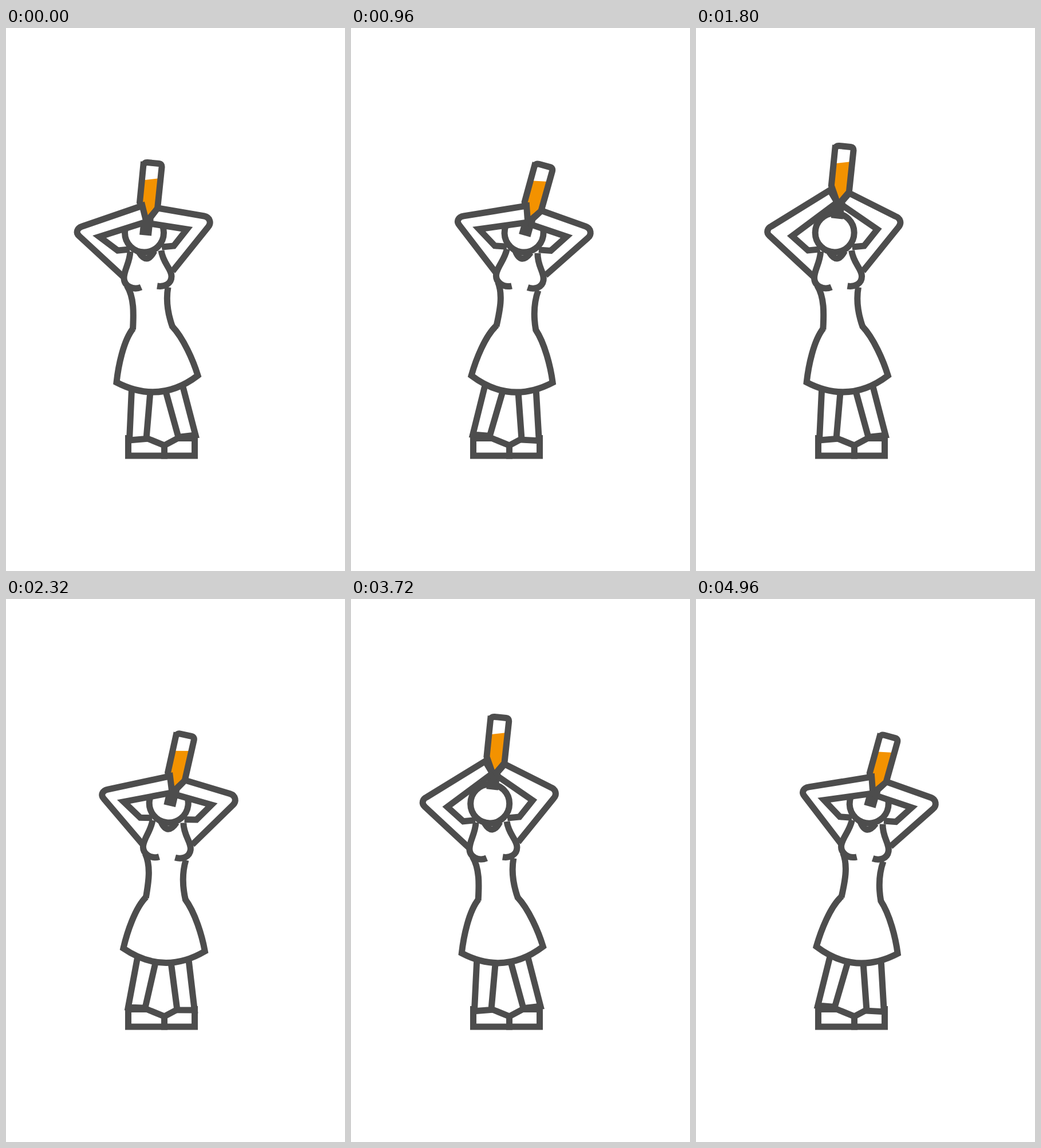
An HTML page for the animation above (5 s loop, 592 by 947 pixels).

```html
<!DOCTYPE html>
<html>
<head>
<meta charset="utf-8">
<style>
  html, body { margin: 0; width: 100%; height: 100%; overflow: hidden; background: #fff; }
  svg { display: block; width: 592px; height: 947px; }
</style>
</head>
<body>
<svg viewBox="0 0 592 947" fill="#fff" stroke="#4d4d4d" stroke-width="11" stroke-miterlimit="10">
  <g id="shoes">
    <path d="M213.5 746V715.5H246L276.5 728V746Z"/>
    <path d="M276.5 746V728L300 715.5H329.5V746Z"/>
  </g>
  <g id="body">
    <g id="legs">
      <path d="M219.5 630L215.5 719L245 716.5L252 634"/>
      <path d="M279 634L301 713.5L331 710L309 626"/>
    </g>
    <path d="M232 391Q246 414 259 389"/>
    <circle cx="241.5" cy="357" r="34"/>
    <g id="bottle" fill="none">
      <path d="M238 265.5L269 262L264 315L248 333L234 303Z" fill="#f39200" stroke="none"/>
      <path d="M240.5 233L233.5 304L243 331M240.5 240Q241 234 247 234.5L267 236.5Q272.5 237 272 243L264.5 315L251 331"/>
      <path d="M246.5 333L243.5 361.5" stroke-width="21"/>
    </g>
    <g id="armsDown">
      <path d="M206 435L128 363C121 357 124 349 133 346L238 310L245 338L163 364L195 388L216 386"/>
      <path d="M291 424L353 347C359 340 356 330 346 328L265 314L252 331V341L316 351L293 380L272 382"/>
    </g>
    <g id="armsUp">
      <path d="M206 435L128 363C121 357 124 349 131 346L233 283L245 303L242 307L167 363L195 388L216 386"/>
      <path d="M291 424L353 347C359 340 356 331 347 328L267 288L253 304L256 310L316 351L293 380L272 382"/>
    </g>
    <path d="M222 524C205 545 196 590 193 618Q268 657 335 606C327 580 310 541 290 520"/>
    <g fill="none">
      <path d="M217 390C216 410 206 422 206 436C206 450 222 458 236 452"/>
      <path d="M271 388C274 410 289 420 289 433C289 446 277 452 264 450"/>
      <path d="M211 449C224 470 223 498 221.5 526M283 452C279 475 283 500 291 522"/>
    </g>
  </g>
</svg>
<script>
  const el = id => document.getElementById(id);
  const turns = [0, 1110, 2000, 2960, 4000, 5000];
  const easeOut = x => 1 - (1 - x) ** 3;

  function draw() {
    const t = Math.floor(performance.now() % 5000 / 40) * 40;
    const i = turns.findLastIndex(start => start <= t);
    const k = easeOut((t - turns[i]) / (turns[i + 1] - turns[i]));
    const raised = i % 2 === 1;
    const lean = raised ? 1 - k : k;

    el('body').setAttribute('transform', `rotate(${9.75 * lean} 271.3 713)`);
    el('legs').setAttribute('transform', `translate(0 630) skewX(${-1.7 * lean}) translate(0 -630)`);
    el('bottle').setAttribute('transform', raised ? 'translate(2 -29)' : '');
    el('armsUp').style.display = raised ? '' : 'none';
    el('armsDown').style.display = raised ? 'none' : '';
    requestAnimationFrame(draw);
  }
  draw();
</script>
</body>
</html>
```
